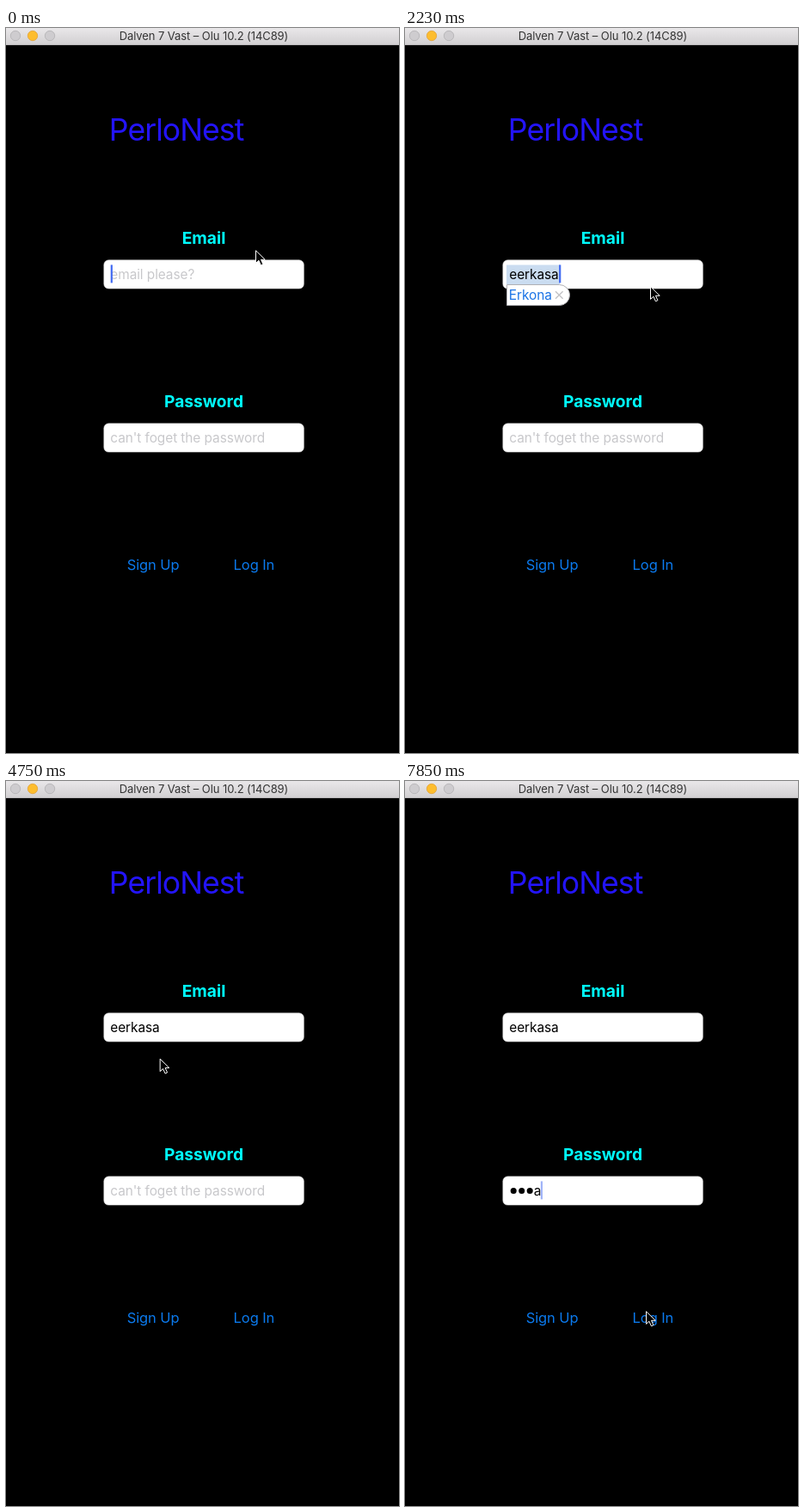
Animation, 457 px wide and 843 px high, one loop 8 s. Source, as an HTML page:

```html
<!DOCTYPE html>
<html lang="en">
<head>
<meta charset="utf-8">
<title>Chat login</title>
<style>
  html, body { margin: 0; width: 100%; height: 100%; overflow: hidden; background: #000; }
  svg { display: block; width: 457px; height: 843px; }
  text { font-family: Inter, Roboto, sans-serif; font-optical-sizing: none; white-space: pre; }
  .bar { font-size: 13px; letter-spacing: -.08px; fill: #343434; text-anchor: middle; }
  .brand { font-size: 35.6px; letter-spacing: -.95px; fill: #2314fa; }
  .label { font-size: 19.2px; font-weight: 700; fill: #00fdff; text-anchor: middle; }
  .field { fill: #fff; stroke: #ccc; stroke-width: .55px; }
  .input { font-size: 15.45px; letter-spacing: -.09px; fill: #000; }
  .hint { fill: #c8c8cb; }
  .link { font-size: 16.5px; letter-spacing: -.1px; fill: #0b7aee; text-anchor: middle; }
  .caret { fill: #426bf2; }
</style>
</head>
<body>
<svg viewBox="0 0 457 843">
  <defs>
    <linearGradient id="chrome" x2="0" y2="1">
      <stop offset="0" stop-color="#e9e7e9"/>
      <stop offset="1" stop-color="#d1cfd1"/>
    </linearGradient>
  </defs>
  <rect width="457" height="843"/>
  <rect width="457" height="20" fill="url(#chrome)"/>
  <rect y="19" width="457" height="1" fill="#b9b7b9"/>
  <g stroke-width=".8">
    <circle cx="11" cy="9" r="5.7" fill="#cecccf" stroke="#b3b1b4"/>
    <circle cx="31" cy="9" r="5.7" fill="#fdbd2e" stroke="#e2a336"/>
    <circle cx="51" cy="9" r="5.7" fill="#cecccf" stroke="#b3b1b4"/>
  </g>
  <text class="bar" x="230" y="14">Dalven 7 Vast – Olu 10.2 (14C89)</text>

  <text class="brand" x="119.8" y="131">PerloNest</text>
  <text class="label" x="230" y="251">Email</text>
  <text class="label" x="230" y="441">Password</text>
  <rect class="field" x="113.8" y="269.8" width="232.6" height="33.3" rx="5.5"/>
  <rect class="field" x="113.8" y="459.8" width="232.6" height="33.3" rx="5.5"/>
  <text class="link" x="171.1" y="630">Sign Up</text>
  <text class="link" x="288.4" y="630">Log In</text>

  <rect id="mark" x="118" y="275.5" width="62" height="22.5" fill="#cadcf0"/>
  <text id="mailHint" class="input hint" x="121.3" y="291.8">email please?</text>
  <text id="mail" class="input" x="121.3" y="291.8"></text>
  <rect id="mailCaret" class="caret" y="275.4" width="2.2" height="21"/>

  <text id="passHint" class="input hint" x="121.3" y="481.8">can't foget the password</text>
  <g id="dots"></g>
  <text id="passLast" class="input" y="481.8">a</text>
  <rect id="passCaret" class="caret" y="465.4" width="2.2" height="21"/>

  <g id="tip">
    <path d="M118.5 298.5H179.5A12 12 0 0 1 179.5 322.5H118.5Z" fill="#fff" stroke="#b0b0b4"/>
    <text class="input" x="120.8" y="316" style="fill:#1c74e6">Erkona</text>
    <path d="M175 306.2l8.6 8.6m0-8.6l-8.6 8.6" stroke="#c2c2c5" stroke-width="1.3"/>
  </g>

  <path id="arrow" d="M.5 .8V15.4L3.9 12.2L6.4 17.8L8.9 16.7L6.5 11.3H11.2Z"
        fill="#000" stroke="#fff" stroke-linejoin="round"/>
</svg>
<script>
const LOOP = 8000, BEATS = 54;
const LEFT = 121.3, DOT = 9.5, PASS_LENGTH = 4;
const MAIL_START = 4, MAIL_LAST = 11, TIP_IN = 12, TIP_OUT = 31;
const PASS_FOCUS = 37, PASS_START = 43, PASS_END = 46;

const $ = id => document.getElementById(id);
const clamp = (v, lo, hi) => Math.min(hi, Math.max(lo, v));
const show = (el, opacity) => el.setAttribute('opacity', +opacity);
const ease = p => (1 - Math.cos(Math.PI * p)) / 2;

// Pointer glides: first beat, last beat, end point
const glides = [
  [14, 15, 285, 300],
  [15, 18, 226, 469],
  [18, 22, 232, 250],
  [22, 28, 179, 323],
  [28, 29, 178, 311],
  [31, 37, 188, 480],
  [38, 39, 200, 483],
  [48, 53, 280, 616]
];

function pointer(beat) {
  let x = 290, y = 258;
  for (const [from, to, endX, endY] of glides) {
    const p = ease(clamp((beat - from) / (to - from), 0, 1));
    x += (endX - x) * p;
    y += (endY - y) * p;
  }
  return [x, y];
}

// Typing, the suggestion and focus each restart the caret's blink
function lastActivity(beat) {
  if (beat < MAIL_START) return -3;
  if (beat < PASS_FOCUS) return Math.min(beat, TIP_IN);
  return beat < PASS_START ? PASS_FOCUS : Math.min(beat, PASS_END);
}

function blink(beat) {
  const age = beat - lastActivity(beat);
  return age < 4 ? 1 : [.5, 0, 0, .5, 1, 1, 1][(age - 4) % 7];
}

for (let i = 0; i < PASS_LENGTH - 1; i++) {
  const dot = document.createElementNS('http://www.w3.org/2000/svg', 'circle');
  dot.setAttribute('cx', 126.2 + i * DOT);
  dot.setAttribute('cy', 476.5);
  dot.setAttribute('r', 3.5);
  $('dots').append(dot);
}

function draw(beat) {
  const caret = blink(beat), inPass = beat >= PASS_FOCUS;

  const letters = clamp(beat - MAIL_START + 1, 0, 6) + (beat >= MAIL_LAST);
  $('mail').textContent = 'eerkasa'.slice(0, letters);
  show($('mailHint'), !letters);
  const mailWidth = letters ? $('mail').getComputedTextLength() : 0;
  $('mailCaret').setAttribute('x', LEFT + .4 + mailWidth);
  show($('mailCaret'), inPass ? 0 : caret);

  const n = clamp(beat - PASS_START + 1, 0, PASS_LENGTH);
  const lastX = LEFT + Math.max(0, n - 1) * DOT;
  show($('passHint'), !n);
  [...$('dots').children].forEach((dot, i) => show(dot, i < n - 1));
  show($('passLast'), n > 0);
  $('passLast').setAttribute('x', lastX);
  $('passCaret').setAttribute('x', n ? lastX + 8 : LEFT + .4);
  show($('passCaret'), inPass ? caret : 0);

  const tip = beat >= TIP_IN && beat < TIP_OUT;
  show($('tip'), tip);
  show($('mark'), tip);
  $('arrow').setAttribute('transform', `translate(${pointer(beat)})`);
}

const start = performance.now();
function tick() {
  const t = (performance.now() - start) % LOOP;
  draw(Math.floor(t / LOOP * BEATS + .1) % BEATS);
  requestAnimationFrame(tick);
}
tick();
</script>
</body>
</html>
```
